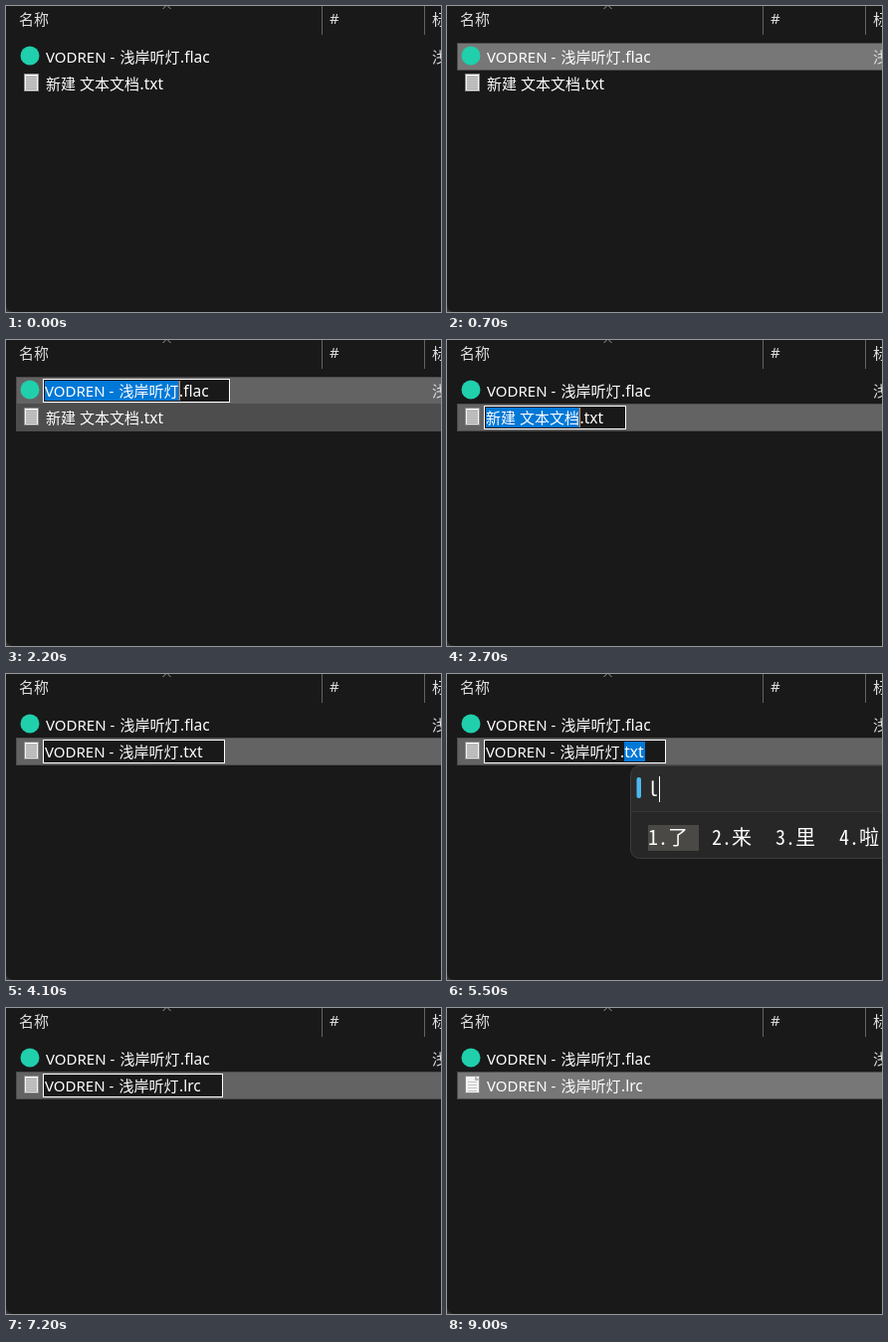
These frames come from a looping animation (437x308 px, 10000 ms). An HTML page with a canvas:

```html
<!DOCTYPE html>
<html lang="zh-CN">
<head>
<meta charset="utf-8">
<title>Rename files</title>
<style>
html, body { margin: 0; width: 100%; height: 100%; overflow: hidden; background: #191919; }
canvas { display: block; width: 437px; height: 308px; }
</style>
</head>
<body>
<canvas id="stage" width="437" height="308"></canvas>
<script>
const W = 437, H = 308, LOOP = 10000;
const ctx = document.getElementById('stage').getContext('2d');
const UI = '"Noto Sans", "Noto Sans CJK SC", "Noto Sans CJK", sans-serif';
const CJK = '"Noto Sans CJK SC", "Noto Sans CJK", sans-serif';
const MONO = '"Noto Sans Mono CJK SC", "Noto Sans CJK SC", "Noto Sans Mono", monospace';
const BG = '#191919', HOVER = '#4d4d4d', ACTIVE = '#777777', EDITING = '#636363';
const BLUE = '#0078d7', BLUE_INVERSE = '#ff8728';

// Text runs: [offset from the left of the name, string, size, font]
const song = ext => [
  [0, 'VODREN -', 15, UI], [74.5, '浅岸听灯', 15, CJK], [135, ext, 15.5, UI]
];
const newDoc = [
  [0, '新建', 15, CJK], [34, '文本文档', 15, CJK], [94.5, '.txt', 15.5, UI]
];

function rect(x, y, w, h, color) {
  ctx.fillStyle = color;
  ctx.fillRect(x, y, w, h);
}

function text(str, x, y, size, font, color = '#fff') {
  ctx.font = size + 'px ' + font;
  ctx.fillStyle = color;
  ctx.fillText(str, x, y);
}

const runs = (list, x, y) =>
  list.forEach(([dx, str, size, font]) => text(str, x + dx, y, size, font));

const within = (t, a, b) => t >= a && t < b;

function rowFill(top, color) {
  if (!color) return;
  rect(10, top, W - 10, 28, HOVER);
  rect(11, top + 1, W - 11, 26, color);
}

function pageIcon(folded) {
  rect(18, 68, 15, 18, '#8c8c8c');
  rect(19, 69, 13, 16, '#f4f4f4');
  if (folded) {
    ctx.fillStyle = '#b5b5b5';
    ctx.beginPath();
    ctx.moveTo(28, 68);
    ctx.lineTo(33, 73);
    ctx.lineTo(28, 73);
    ctx.fill();
    for (let y = 74; y < 84; y += 3) rect(21, y, 9, 1, '#c4c4c4');
  } else {
    for (let y = 71; y < 84; y += 2) rect(20, y, 11, 1, '#858585');
  }
}

// Rename field: white frame, optional selection, name and caret
function field(top, right, name, sel, caret) {
  rect(37, top, right - 37, 24, '#fff');
  rect(38, top + 1, right - 38 - 1, 22, BG);
  if (sel) rect(sel[0], top + 2, sel[1] - sel[0], 20, BLUE);
  runs(name, 39, top + 18);
  if (caret) rect(caret, top + 2, 1, 20, sel ? BLUE_INVERSE : '#fff');
}

function header() {
  text('名称', 13, 18.5, 15, CJK, '#dedede');
  text('#', 325, 18, 15, UI, '#dedede');
  text('标题', 428, 18.5, 15, CJK, '#dedede');
  rect(317, 0, 1, 29, '#636363');
  rect(420, 0, 1, 29, '#636363');
  ctx.strokeStyle = '#9a9a9a';
  ctx.lineWidth = 1;
  ctx.beginPath();
  ctx.moveTo(157.5, 3);
  ctx.lineTo(161.5, -1);
  ctx.lineTo(165.5, 3);
  ctx.stroke();
}

function corner() {
  ctx.fillStyle = '#343434';
  ctx.beginPath();
  ctx.moveTo(0, H - 8);
  ctx.quadraticCurveTo(0, H, 8, H);
  ctx.lineTo(0, H);
  ctx.fill();
}

function firstRow(t) {
  const editing = within(t, 1100, 2500);
  rowFill(37, editing ? EDITING :
    within(t, 200, 700) ? HOVER :
    within(t, 700, 1100) ? ACTIVE : null);
  ctx.fillStyle = '#20cfac';
  ctx.beginPath();
  ctx.arc(24, 50, 9.5, 0, Math.PI * 2);
  ctx.fill();
  if (editing) {
    field(39, 225, song('.flac'), [39, 174], !within(t, 1600, 2100) && 174);
  } else {
    runs(song('.flac'), 40, 57);
  }
  text('浅岸听灯', 428, 57, 15, CJK, '#dedede');
}

function secondRow(t) {
  const editing = within(t, 2700, 8900);
  rowFill(64, editing ? EDITING :
    within(t, 2200, 2500) ? HOVER :
    t >= 2500 ? ACTIVE : null);
  pageIcon(t >= 9000);
  if (!editing) {
    runs(t < 2700 ? newDoc : song('.lrc'), 40, 84);
  } else if (t < 3300) {
    field(66, 180, newDoc, [39, 133], t < 3200 && 133);
  } else if (t < 4400) {
    field(66, 220, song('.txt'), null, t < 4100 && 174);
  } else if (t < 6600) {
    // The selection grows leftwards one letter at a time
    const start = 192 - 7 * Math.min(2, Math.floor((t - 4400) / 100));
    const blinkOff = within(t, 5100, 5600) || t >= 6100;
    field(66, 220, song('.txt'), [start, 199], !blinkOff && start);
  } else {
    field(66, 218, song('.lrc'), null, !within(t, 7200, 8700) && 196);
  }
}

function inputPanel(t) {
  if (!within(t, 5500, 6600)) return;
  const typed = 'lrc'.slice(0, t < 5700 ? 1 : t < 6000 ? 2 : 3);
  const words = [
    ['了', '来', '里', '啦'],
    ['例如', '老人', '恋人'],
    ['例如此', '老人吃', '来人车']
  ][typed.length - 1];

  ctx.save();
  ctx.beginPath();
  ctx.roundRect(184.5, 92.5, 300, 93, 9);
  ctx.fillStyle = '#2b2b2b';
  ctx.fill();
  ctx.save();
  ctx.clip();
  rect(184, 138, W, 48, '#272727');
  rect(184, 138, W, 1, '#363636');
  ctx.restore();
  ctx.strokeStyle = '#3c3c3c';
  ctx.lineWidth = 1;
  ctx.stroke();
  ctx.fillStyle = '#4cb8f0';
  ctx.beginPath();
  ctx.roundRect(190.5, 104, 4.5, 21, 2);
  ctx.fill();
  ctx.restore();

  text(typed, 202, 123, 20, MONO);
  rect(202 + typed.length * 10 + 1, 103, 1, 26, '#fff');

  let x = 202;
  words.forEach((word, i) => {
    const width = 20 + word.length * 20;
    if (i === 0) rect(x, 152, width + 11, 26, '#4a4946');
    text(i + 1 + '.', x, 172, 20, MONO);
    text(word, x + 20, 172, 20, CJK);
    x += width + 24;
  });
}

function draw(t) {
  rect(0, 0, W, H, BG);
  header();
  firstRow(t);
  secondRow(t);
  inputPanel(t);
  corner();
}

const began = performance.now();
function tick() {
  draw((performance.now() - began) % LOOP);
  requestAnimationFrame(tick);
}
tick();
</script>
</body>
</html>
```
